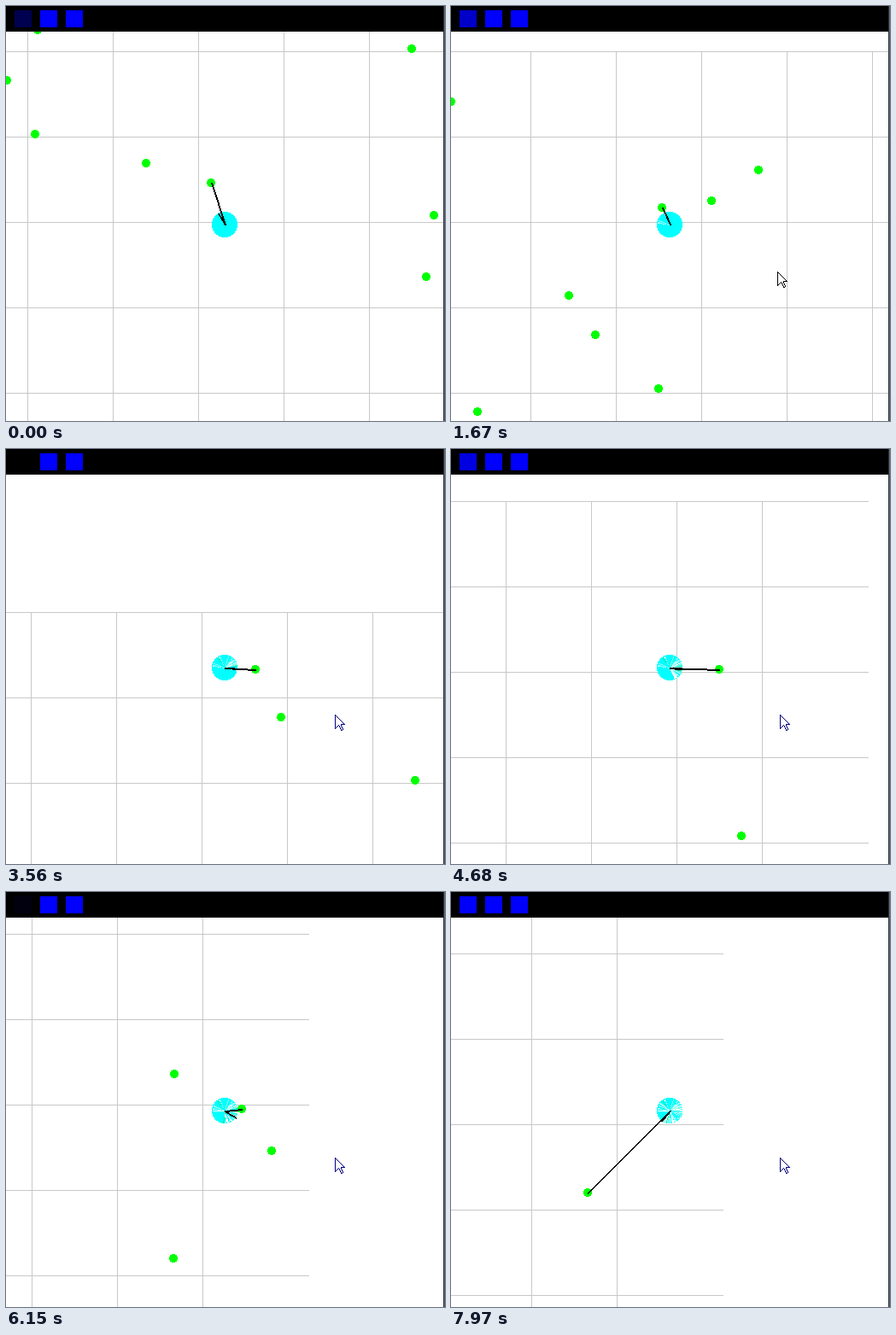
An HTML page with a canvas that plays this animation: 514x486 px, repeating every 8000 ms.

```html
<!DOCTYPE html>
<html lang="en">
<head>
<meta charset="utf-8">
<title>Forager</title>
<style>
html, body { margin: 0; width: 100%; height: 100%; overflow: hidden; background: #fff; }
canvas { display: block; }
</style>
</head>
<body>
<canvas id="stage" width="514" height="486"></canvas>
<script>
const ctx = document.getElementById('stage').getContext('2d');
const LOOP = 8000, STEP = 70, LAST = 114;
const CENTER = 256, GRID_RIGHT = 1125, BITE = 18, RADIUS = 15;

// Each leg starts somewhere, passes its meals in order, then swings wide before the next one
const legs = [
  { t: -100, at: [752, 415], glow: 80 },
  { t: 0, at: [731, 403], glow: 80, meals: [[715, 354], [639, 331], [509, 297], [476, 234]] },
  { t: 1670, at: [463, 203], glow: 200, meals: [[454, 183], [512, 175]], swing: [[597, 186]] },
  { t: 2580, at: [582, 162], glow: 235, meals: [[567, 139]], swing: [[650, 62]] },
  { t: 3560, at: [727, 65], glow: 0, meals: [[763, 67], [793, 123]], swing: [[845, 188]] },
  { t: 4680, at: [892, 195], glow: 225, meals: [[950, 197], [976, 392]], swing: [[1000, 478]] },
  { t: 6150, at: [1026, 507], glow: 15, meals: [[1046, 505], [1081, 554], [967, 464]],
    swing: [[945, 440], [1035, 440], [1090, 530]] },
  { t: 7970, at: [1062, 584], glow: 250, meals: [[966, 680]] },
  { t: 8600, at: [940, 700], glow: 250 }
];
const untouched = [[345, 286], [376, 332], [450, 395], [238, 422], [207, 59]];

const food = [...legs.flatMap(leg => leg.meals ?? []), ...untouched]
  .map(([x, y]) => ({ x, y, eatenAt: Infinity }));

// Constant speed within a leg: every stop gets its time from the distance covered
const route = legs.slice(0, -1).flatMap((leg, i) => {
  const next = legs[i + 1];
  const stops = [leg.at, ...(leg.meals ?? []), ...(leg.swing ?? []), next.at];
  let total = 0;
  const covered = stops.map(([x, y], k) =>
    k ? total += Math.hypot(x - stops[k - 1][0], y - stops[k - 1][1]) : 0);
  return stops.slice(0, -1).map(([x, y], k) =>
    ({ t: leg.t + (next.t - leg.t) * covered[k] / total, x, y }));
});

const random = n => {
  const s = Math.sin(n * 12.9898) * 43758.5453;
  return s - Math.floor(s);
};
const pick = (list, seed) => list[Math.floor(random(seed) * list.length)];

function segment(keys, t) {
  let i = 1;
  while (i < keys.length - 3 && keys[i + 1].t <= t) i++;
  return i;
}

// Hermite curve; returns position and direction of travel
function travel(t) {
  const i = segment(route, t), a = route[i], b = route[i + 1];
  const span = b.t - a.t, u = (t - a.t) / span;
  const slope = (k, axis) =>
    (route[k + 1][axis] - route[k - 1][axis]) / (route[k + 1].t - route[k - 1].t) * span;
  const [x, y] = ['x', 'y'].map(axis => {
    const p = a[axis], q = b[axis], m = slope(i, axis), n = slope(i + 1, axis);
    const c = 3 * (q - p) - 2 * m - n, d = 2 * (p - q) + m + n;
    return { at: p + u * (m + u * (c + u * d)), rate: m + u * (2 * c + 3 * u * d) };
  });
  return { x: Math.round(x.at), y: Math.round(y.at), heading: Math.atan2(y.rate, x.rate) };
}

const timeOf = n => Math.max(0, n * STEP - 10);
const steps = [];
for (let n = 0; n <= LAST; n++) {
  const s = travel(timeOf(n));
  const distance = f => Math.hypot(f.x - s.x, f.y - s.y);
  for (const f of food) if (f.eatenAt > n && distance(f) < BITE) f.eatenAt = n;
  s.target = food.filter(f => f.eatenAt > n).reduce((a, b) => distance(a) < distance(b) ? a : b);
  s.aim = Math.atan2(s.target.y - s.y, s.target.x - s.x);
  steps.push(s);
}

// Hard-edged shapes, drawn in whole pixels
function disc(x, y, r, color) {
  ctx.fillStyle = color;
  for (let row = -r; row < r; row++) {
    const half = Math.round(Math.sqrt(r * r - (row + 0.5) ** 2));
    ctx.fillRect(x - half, y + row, 2 * half, 1);
  }
}

function line(x1, y1, x2, y2, color, width) {
  const dx = x2 - x1, dy = y2 - y1, steep = Math.abs(dy) > Math.abs(dx);
  const count = Math.max(1, Math.round(Math.max(Math.abs(dx), Math.abs(dy))));
  ctx.fillStyle = color;
  for (let k = 0; k <= count; k++) {
    const x = Math.round(x1 + dx * k / count), y = Math.round(y1 + dy * k / count);
    ctx.fillRect(x, y, steep ? width : 1, steep ? 1 : width);
  }
}

const ray = (angle, length, color, width) =>
  line(CENTER, CENTER, CENTER + length * Math.cos(angle), CENTER + length * Math.sin(angle), color, width);

function drawGrid(dx, dy) {
  ctx.fillStyle = '#c8c8c8';
  const top = Math.max(0, dy), right = Math.min(512, GRID_RIGHT + dx);
  for (let v = 0; v <= 1000; v += 100) {
    ctx.fillRect(v + dx, top, 1, 486 - top);
    ctx.fillRect(0, v + dy, right, 1);
  }
}

// Streaks that past rays leave on the body
function drawStreaks(n) {
  for (let k = 11; k < n; k++) {
    ray(steps[k].heading, 14, pick(['#fff', '#00ffff', '#8cffff'], k), 1);
    if (k > 24) ray(steps[k].aim, 14, pick(['#00e68c', '#00ffff', '#8cffe1', '#fff'], k + 200), 1);
  }
}

function drawSignals(t) {
  const i = segment(legs, t), a = legs[i], b = legs[i + 1];
  const glow = a.glow + (b.glow - a.glow) * Math.min(1, (t - a.t) / (b.t - a.t));
  [glow, 255, 252].forEach((blue, k) => {
    ctx.fillStyle = `rgb(0,0,${Math.round(blue)})`;
    ctx.fillRect(10 + 30 * k, 5, 20, 20);
  });
}

function drawPointer(x, y, color) {
  const shape = [[0, 0], [0, 16], [4, 12], [7, 18], [8, 18], [9, 17], [7, 12], [7, 11], [11, 11]];
  const corners = shape.map(([px, py]) => [x + px, y + py]);
  ctx.fillStyle = '#fff';
  ctx.beginPath();
  corners.forEach(corner => ctx.lineTo(...corner));
  ctx.fill();
  corners.forEach((corner, k) => line(...corner, ...corners[(k + 1) % corners.length], color, 1));
}

function draw(n) {
  const s = steps[n], dx = CENTER - s.x, dy = CENTER - s.y;
  ctx.fillStyle = '#fff';
  ctx.fillRect(0, 0, 514, 486);
  drawGrid(dx, dy);
  for (const f of food) if (f.eatenAt > n) disc(f.x + dx, f.y + dy, 5, '#00ff00');
  disc(CENTER, CENTER, RADIUS, '#00ffff');
  drawStreaks(n);
  line(CENTER, CENTER, s.target.x + dx, s.target.y + dy, '#000', 2);
  ray(s.heading, RADIUS, '#000', 2);
  ctx.fillStyle = '#000';
  ctx.fillRect(0, 0, 512, 30);
  drawSignals(timeOf(n));
  if (n >= 23) drawPointer(n < 26 ? 382 : 385, 311, n < 26 ? '#000' : '#000080');
  ctx.fillStyle = '#2a3038';
  ctx.fillRect(512, 0, 1, 486);
  ctx.fillStyle = '#5f6873';
  ctx.fillRect(513, 0, 1, 486);
}

let start;
function tick(now) {
  start ??= now;
  draw(Math.min(LAST, Math.floor(((now - start) % LOOP + 10) / STEP)));
  requestAnimationFrame(tick);
}
draw(0);
requestAnimationFrame(tick);
</script>
</body>
</html>
```
